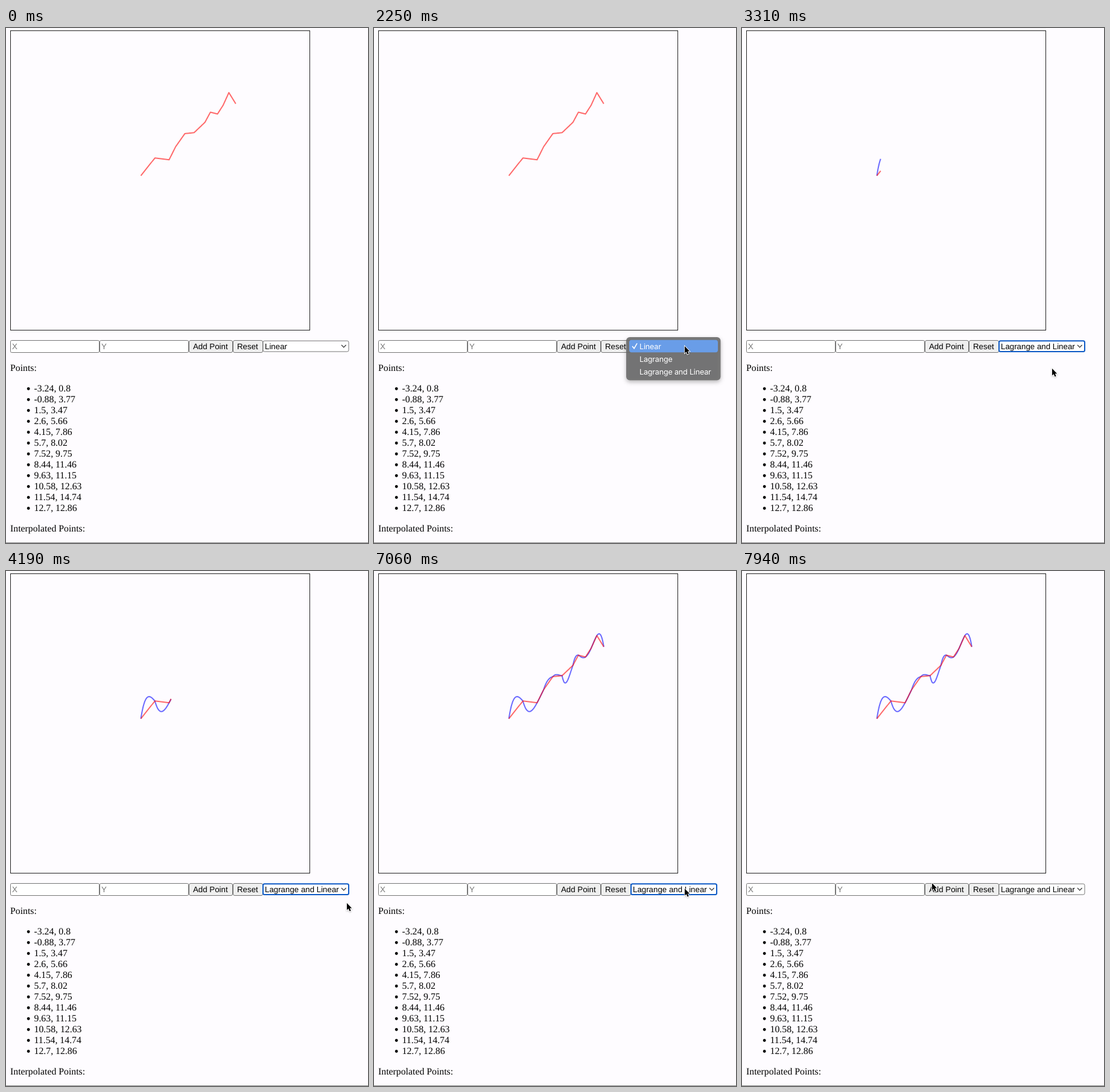
Animation of 600 by 853 pixels, one loop 8000 ms. Source, as an HTML page:

```html
<!DOCTYPE html>
<html lang="en">
<head>
<meta charset="utf-8">
<title>Interpolation</title>
<style>
  html, body { margin: 0; width: 100%; height: 100%; overflow: hidden; background: #fefcff; }
  svg { display: block; width: 600px; height: 853px; }
  text { white-space: pre; text-rendering: geometricPrecision; }
  .serif { font: 15.8px "Liberation Serif", "Times New Roman", serif; }
  .ui { font: 13.3px "Liberation Sans", Arial, sans-serif; }
  .hint { fill: #757575; }
  .menu { font: 12.6px Inter, sans-serif; letter-spacing: -.2px; fill: #fff; }
  .box { stroke: #767676; fill: #fff; }
  .button { fill: #efefef; }
  .plot { fill: none; stroke-width: 2; stroke-linejoin: round; stroke-opacity: .58; }
</style>
</head>
<body>
<svg viewBox="0 0 600 853">
  <defs>
    <filter id="shade" x="-20%" y="-30%" width="140%" height="170%">
      <feDropShadow dx="0" dy="3" stdDeviation="3.5" flood-opacity=".32"/>
    </filter>
    <filter id="soft" x="-50%" y="-50%" width="200%" height="200%">
      <feDropShadow dx="0" dy="1" stdDeviation=".8" flood-opacity=".3"/>
    </filter>
  </defs>
  <rect width="600" height="853" fill="#fefcff"/>
  <rect x="7.5" y="4.5" width="496" height="496" fill="none" stroke="#222"/>
  <path id="blue" class="plot" stroke="#00f"/>
  <path id="red" class="plot" stroke="#f00"/>

  <g class="ui">
    <rect class="box" x="7.5" y="517.5" width="147" height="20" rx="2"/>
    <rect class="box" x="155.5" y="517.5" width="147" height="20" rx="2"/>
    <rect class="box button" x="303.5" y="517.5" width="72" height="20" rx="2.5"/>
    <rect class="box button" x="376.5" y="517.5" width="49" height="20" rx="2.5"/>
    <rect id="select" class="box" x="426" y="518.2" width="142" height="17.8" rx="2.5"/>
    <text class="hint" x="10" y="532">X</text>
    <text class="hint" x="158" y="532">Y</text>
    <text x="310" y="532">Add Point</text>
    <text x="383" y="532">Reset</text>
    <text id="choice" x="429" y="532"></text>
    <path d="M556 525l3.8 3.8 3.8-3.8" fill="none" stroke="#333" stroke-width="1.2"/>
  </g>

  <g id="list" class="serif">
    <text x="7" y="567.5">Points:</text>
    <text x="7" y="833.5">Interpolated Points:</text>
  </g>
  <rect y="852" width="600" height="1" fill="#888"/>

  <g id="menu">
    <g filter="url(#shade)">
      <rect x="418" y="512" width="156.5" height="71.5" rx="6" fill="#666" fill-opacity=".86"/>
    </g>
    <rect id="hover" x="423" width="147" height="20.5" rx="4" fill="#699de8"/>
    <path d="M428.5 527.5l2.6 3.3 4.6-8" fill="none" stroke="#fff" stroke-width="1.6" stroke-linecap="round"/>
    <g class="menu">
      <text x="440" y="531.7">Linear</text>
      <text x="440" y="552.6">Lagrange</text>
      <text x="440" y="573.5">Lagrange and Linear</text>
    </g>
  </g>

  <g id="cursor" filter="url(#soft)">
    <path d="M0 0V11.6L2.7 9.2 4.5 13.6 6.6 12.7 4.8 8.5H8.2Z" stroke="#fff" stroke-width="1.6" paint-order="stroke"/>
  </g>
</svg>
<script>
const LOOP = 8000, OPEN = 2000, PICK = 3185, BLUR = 7450, SHOWN = 300;
const SPEED = 5.04;   // plot units per second
const SCALE = 9.87, CX = 255.5, CY = 252.5, ORDER = 5;

const points = [
  [-3.24, 0.8], [-0.88, 3.77], [1.5, 3.47], [2.6, 5.66], [4.15, 7.86], [5.7, 8.02],
  [7.52, 9.75], [8.44, 11.46], [9.63, 11.15], [10.58, 12.63], [11.54, 14.74], [12.7, 12.86]
];
const first = points[0][0], last = points[points.length - 1][0];

// time, x, y of the pointer tip
const track = [
  [300, 544, 682], [1300, 515, 527], [2300, 515, 527], [2800, 514, 564], [3300, 514, 564],
  [4190, 565, 550], [5690, 564, 546], [6000, 532, 548], [6500, 515, 529], [7060, 515, 526],
  [7290, 568, 530], [7420, 565, 530], [7900, 315, 517], [8000, 315, 517]
];

const $ = id => document.getElementById(id);
const show = (id, on) => $(id).setAttribute("visibility", on ? "visible" : "hidden");

function add(tag, attrs, text = "") {
  const el = document.createElementNS($("list").namespaceURI, tag);
  for (const key in attrs) el.setAttribute(key, attrs[key]);
  el.textContent = text;
  $("list").append(el);
}

points.forEach((p, i) => {
  add("circle", { cx: 37.2, cy: 597.5 + 18 * i, r: 2.4 });
  add("text", { x: 46.5, y: 602 + 18 * i }, p.join(", "));
});

function segment(x) {
  let i = 0;
  while (i < points.length - 2 && x > points[i + 1][0]) i++;
  return i;
}

function linear(x) {
  const i = segment(x), [x0, y0] = points[i], [x1, y1] = points[i + 1];
  return y0 + (y1 - y0) * (x - x0) / (x1 - x0);
}

// Lagrange polynomial over the nodes that follow x
function lagrange(x) {
  const start = Math.min(segment(x), points.length - ORDER);
  const nodes = points.slice(start, start + ORDER);
  return nodes.reduce((sum, [xi, yi]) =>
    sum + nodes.reduce((v, [xj]) => xj === xi ? v : v * (x - xj) / (xi - xj), yi), 0);
}

function curve(f, end) {
  const xs = points.map(p => p[0]).filter(x => x < end);
  for (let x = first; x < end; x += 0.1) xs.push(x);
  xs.push(end);
  xs.sort((a, b) => a - b);
  return "M" + xs.map(x => `${(CX + x * SCALE).toFixed(2)} ${(CY - f(x) * SCALE).toFixed(2)}`).join("L");
}

function pointer(t) {
  let i = 0;
  while (i < track.length - 2 && t > track[i + 1][0]) i++;
  const [t0, x0, y0] = track[i], [t1, x1, y1] = track[i + 1];
  const u = Math.min(1, Math.max(0, (t - t0) / (t1 - t0))), e = u * u * (3 - 2 * u);
  return [x0 + (x1 - x0) * e, y0 + (y1 - y0) * e];
}

function render(t) {
  const picked = t >= PICK, focused = picked && t < BLUR;
  const end = picked ? Math.min(last, first + (t - PICK) / 1000 * SPEED) : last;
  $("red").setAttribute("d", curve(linear, end));
  $("blue").setAttribute("d", picked ? curve(lagrange, end) : "");

  $("choice").textContent = picked ? "Lagrange and Linear" : "Linear";
  $("select").style.stroke = focused ? "#0f5bc6" : "";
  $("select").style.strokeWidth = focused ? 2 : 1;

  const [x, y] = pointer(t);
  const row = Math.min(2, Math.max(0, Math.floor((y - 517) / 20.9)));
  $("hover").setAttribute("y", 516.8 + 20.9 * row);
  show("menu", t >= OPEN && !picked);
  show("cursor", t >= SHOWN);
  $("cursor").setAttribute("transform", `translate(${x.toFixed(2)} ${y.toFixed(2)})`);
}

const began = performance.now();
function tick() {
  render((performance.now() - began) % LOOP);
  requestAnimationFrame(tick);
}
tick();
</script>
</body>
</html>
```
